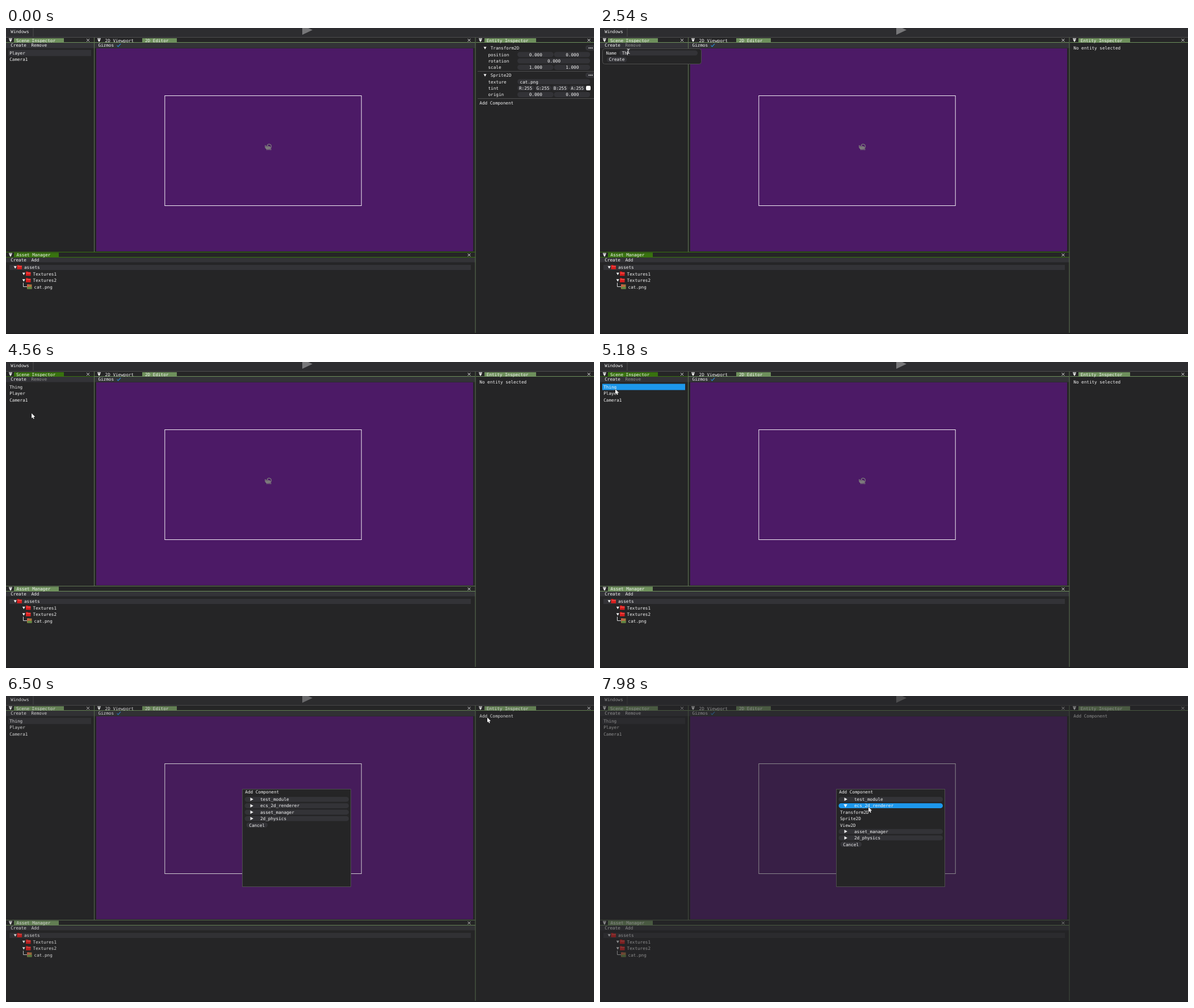
Recreate the animation shown at these times as an HTML page with a canvas. Size 1036 px wide and 540 px high, loop 8 s.

```html
<!DOCTYPE html>
<html lang="en">
<head>
<meta charset="utf-8">
<title>Scene editor</title>
<style>
html, body { margin: 0; width: 100%; height: 100%; overflow: hidden; background: #252526; }
canvas { display: block; }
</style>
</head>
<body>
<canvas id="stage" width="1036" height="540"></canvas>
<script>
const LOOP = 8000;
const ctx = document.getElementById('stage').getContext('2d');
const C = {
  bg: '#252526', bar: '#333337', top: '#2d2d30', edge: '#4e4e4e', rule: '#5f7552',
  tab: '#6e905c', focus: '#38720f', hover: '#1d97ec', press: '#0077c8',
  text: '#f4f4f4', off: '#8f8f8f', view: '#4c1a66'
};

// Moments at which the interface changes
const T = {
  popup: 1000, created: 4170, selected: 5410, modal: 6500, expanded: 7660
};
const typing = [[2320, 'T'], [2540, 'Th'], [2620, 'Thi'], [2860, 'Thin'], [3010, 'Thing']];
const presses = [[4090, 4170], [5330, 5410], [7580, 7660]];

// Pointer track: each entry holds until the next
const track = [];
const hold = (t, x, y) => track.push({ t, x, y });

function glide(t0, t1, n, a, b, c = [(a[0] + b[0]) / 2, (a[1] + b[1]) / 2]) {
  for (let i = 0; i < n; i++) {
    const s = (i + 1) / n, u = s * (1.2 - 0.2 * s), v = 1 - u;
    const mix = k => v * v * a[k] + 2 * u * v * c[k] + u * u * b[k];
    hold(t0 + (t1 - t0) * i / (n - 1), mix(0), mix(1));
  }
}

glide(220, 840, 9, [1036, 551], [20, 28]);
hold(1000, 22, 27);
hold(1075, 23, 25);
hold(1150, 25, 26);
glide(1225, 1375, 3, [25, 26], [44, 42]);
hold(1450, 44, 41);
hold(1525, 45, 40);
hold(1600, 44, 38);
hold(1760, 50, 41);
hold(3620, 50, 42);
glide(3700, 3930, 4, [50, 42], [27, 51]);
glide(4245, 4640, 6, [27, 51], [48, 97]);
glide(4820, 5180, 6, [48, 97], [27, 48]);
glide(5650, 6189, 8, [27, 48], [850, 28], [430, 272]);
glide(6266, 6420, 3, [850, 28], [848, 38]);
glide(6810, 7430, 9, [848, 38], [472, 191], [648, 103]);
hold(7890, 472.5, 194);
hold(7980, 473, 196);

const lastBefore = (list, t, key) => list.filter(e => e[key] <= t).pop();

function rect(x, y, w, h, fill) {
  ctx.fillStyle = fill;
  ctx.fillRect(x, y, w, h);
}

function pill(x, y, w, h = 9, fill = C.bar, r = 4.5, stroke) {
  ctx.beginPath();
  ctx.roundRect(x, y, w, h, r);
  ctx.fillStyle = fill;
  ctx.fill();
  if (stroke) line(stroke);
}

function line(color, width = 1) {
  ctx.strokeStyle = color;
  ctx.lineWidth = width;
  ctx.stroke();
}

function path(points, closed) {
  ctx.beginPath();
  points.forEach(p => ctx.lineTo(p[0], p[1]));
  if (closed) ctx.closePath();
}

function poly(points, fill) {
  path(points, true);
  ctx.fillStyle = fill;
  ctx.fill();
}

// y is the middle of the capitals
function text(s, x, y, fill = C.text, align = 'left') {
  ctx.textAlign = align;
  ctx.fillStyle = fill;
  ctx.fillText(s, x, y + 2.8);
}

const arrowDown = (x, y, r = 2.5) =>
  poly([[x - r, y - r * 0.8], [x + r, y - r * 0.8], [x, y + r]], C.text);
const arrowRight = (x, y) => poly([[x - 2, y - 3], [x + 3.3, y], [x - 2, y + 3]], C.text);

function cross(x, y) {
  path([[x - 2.5, y - 2.5], [x + 2.5, y + 2.5]]);
  line(C.text, 0.9);
  path([[x + 2.5, y - 2.5], [x - 2.5, y + 2.5]]);
  line(C.text, 0.9);
}

function titleBar(x, y, w, closeX, color) {
  rect(x, y, w, 8, C.bg);
  rect(x, y + 8, w, 1, color);
  rect(x + 5, y + 1, 6, 1, C.text);
  arrowDown(x + 8, y + 5, 2.9);
  cross(closeX, y + 4.5);
}

function tab(label, x, y, w, textX, color) {
  rect(x, y + 1, w, 8, color);
  text(label, textX, y + 4.7);
}

function folder(x, y) {
  poly([[x, y - 4], [x + 3.5, y - 4], [x + 4.5, y - 3], [x + 8.5, y - 3], [x + 8.5, y + 3.5], [x, y + 3.5]], '#d91e1e');
  rect(x + 1, y - 1.8, 7.5, 0.8, '#ff7770');
}

function cat() {
  ctx.beginPath();
  ctx.ellipse(462, 211.5, 4.7, 3, 0, 0, 7);
  ctx.fillStyle = '#7c777b';
  ctx.fill();
  poly([[456, 206.5], [458, 208], [460, 208], [461.5, 206.5], [461.5, 212], [459, 213.5], [456.4, 211.5]], '#817d80');
  ctx.beginPath();
  ctx.arc(463.5, 209, 4, 3.6, 7.3);
  line('#777379', 1.3);
  for (const x of [459, 461.5, 464, 466]) rect(x, 213, 1.2, 2.6, '#77727a');
  rect(457.4, 209, 1, 1, '#35253f');
  rect(459.7, 209, 1, 1, '#35253f');
}

function topBar() {
  rect(0, 0, 1036, 16, C.top);
  rect(0, 16, 1036, 1, C.edge);
  text('Windows', 8.3, 6);
  rect(47.5, 0, 1, 15, C.edge);
  poly([[522, -5], [540, 3.5], [522, 12]], '#777779');
}

function sceneList(t, p, pressed) {
  const names = t < T.created ? ['Player', 'Camera1'] : ['Thing', 'Player', 'Camera1'];
  const selected = t < T.popup || t >= T.selected ? 0 : -1;
  const live = t >= T.created && t < T.modal;
  names.forEach((name, i) => {
    const y = 38.5 + i * 11.4;
    const over = live && p.x < 150 && p.y >= y && p.y < y + 11.4;
    if (over || i === selected) rect(4, y, 146, 11, over ? (pressed ? C.press : C.hover) : C.bar);
    text(name, 6.2, y + 5.5);
  });
}

function scene(t, p, pressed) {
  const color = t >= T.created && t < T.modal ? C.focus : C.tab;
  titleBar(0, 17, 155, 144.5, color);
  tab('Scene Inspector', 14, 17, 88, 18, color);
  rect(0, 26, 155, 9.5, C.bar);
  text('Create', 8.3, 30.5);
  text('Remove', 44.5, 30.5, t >= T.popup && t < T.selected ? C.off : C.text);
  sceneList(t, p, pressed);
}

function viewport() {
  titleBar(156, 17, 671, 816, C.tab);
  text('2D Viewport', 174.6, 21.7);
  tab('2D Editor', 240, 17, 61, 245, C.tab);
  rect(156, 26, 671, 9.5, C.bar);
  text('Gizmos', 162.4, 30.5);
  path([[195.5, 30.5], [197.5, 32.8], [202, 27.8]]);
  line('#2f8fdc', 1.1);
  rect(159, 36, 664, 358, C.view);
  ctx.strokeStyle = '#f3eef5';
  ctx.lineWidth = 1;
  ctx.strokeRect(279.8, 119.5, 346.4, 194);
  cat();
}

function assets(t) {
  const color = t < T.created ? C.focus : C.tab;
  titleBar(0, 396, 827, 816, color);
  tab('Asset Manager', 14, 395.5, 79, 18.6, color);
  rect(0, 405, 827, 8.5, C.bar);
  text('Create', 8.3, 409);
  text('Add', 44.5, 409);
  rect(6, 418, 813, 9, C.bar);
  arrowDown(16.2, 422.3);
  folder(19.5, 422.3);
  text('assets', 32, 422.5);
  ['Textures1', 'Textures2'].forEach((name, i) => {
    const y = 433.8 + i * 11.4;
    arrowDown(31.3, y);
    folder(35, y);
    text(name, 47.6, y);
  });
  path([[30.5, 449.5], [30.5, 456.5], [37, 456.5]]);
  line('#d8d8d8');
  rect(37, 452.5, 8.5, 8, '#a8763f');
  rect(37, 452.5, 4, 3.5, '#c95d45');
  rect(38, 457, 7.5, 3.5, '#5d8a45');
  text('cat.png', 49.6, 456.7);
}

function field(label, y, values) {
  const w = 129 / values.length;
  text(label, 849.5, y);
  values.forEach((v, i) => {
    pill(901 + i * w, y - 4.5, w - 0.8);
    text(v, 901 + (i + 0.5) * w, y, C.text, 'center');
  });
}

function component(name, y) {
  arrowDown(844, y);
  text(name, 853.7, y);
  pill(1021, y - 5, 20, 9.5);
  for (let i = 0; i < 3; i++) rect(1026.5 + i * 2.7, y - 0.8, 1.6, 1.6, C.text);
}

function inspector(t, p) {
  titleBar(828, 17, 208, 1027, C.tab);
  tab('Entity Inspector', 843, 17, 91, 846.8, C.tab);
  if (t < T.popup) {
    component('Transform2D', 35.3);
    field('position', 46.7, ['0.000', '0.000']);
    field('rotation', 58, ['0.000']);
    field('scale', 69.4, ['1.000', '1.000']);
    rect(831, 76, 205, 1, C.edge);
    component('Sprite2D', 83.3);
    field('texture', 94.7, ['']);
    text('cat.png', 905.6, 94.7);
    text('tint', 849.5, 106);
    ['R', 'G', 'B', 'A'].forEach((c, i) => {
      pill(901 + i * 30.4, 101.5, 29.5);
      text(c + ':255', 904 + i * 30.4, 106);
    });
    pill(1022, 102, 8, 8, '#fff', 2);
    field('origin', 117.5, ['0.000', '0.000']);
    rect(831, 124, 205, 1, C.edge);
    text('Add Component', 834.3, 131.7);
  } else if (t < T.selected) {
    text('No entity selected', 834.3, 35.3);
  } else {
    if (t < T.modal && p.x > 830 && p.y > 30 && p.y < 41) rect(831, 30, 201, 11, C.hover);
    text('Add Component', 834.3, 35.3);
  }
}

function createPopup(t, p, pressed) {
  const over = p.y > 50 && p.x > 12 && p.x < 47;
  pill(4.5, 36.5, 174, 27, C.bg, 4, C.edge);
  text('Name', 10.8, 44);
  pill(34, 39.5, 138);
  const typed = lastBefore(typing, t, 0);
  if (typed) {
    text(typed[1], 38.8, 44);
    rect(39 + typed[1].length * 4.6, 40, 0.8, 8, C.text);
  }
  pill(12, 51, 35, 9.5, over ? (pressed ? C.press : C.hover) : C.bar);
  text('Create', 15.7, 55.5);
}

function modal(t, p, pressed) {
  const dim = Math.min(3, 1 + Math.floor((t - T.modal) / 80)) / 3;
  rect(0, 0, 1036, 540, `rgba(37,37,38,${dim * 0.5})`);
  rect(416, 164, 192, 173, C.edge);
  rect(417, 165, 190, 171, C.bg);
  text('Add Component', 421.3, 169);
  let y = 182.3;
  for (const name of ['test_module', 'ecs_2d_renderer', 'asset_manager', '2d_physics']) {
    const open = name === 'ecs_2d_renderer' && t >= T.expanded;
    const over = p.x > 420 && p.x < 604 && p.y > y - 5.2 && (p.y < y + 5.2 || open);
    pill(420.5, y - 4.4, 183.5, 8.8, over ? (pressed ? C.press : C.hover) : C.bar, 4.4);
    (open ? arrowDown : arrowRight)(432.5, y, 3.2);
    text(name, 448, y);
    y += 11.35;
    if (!open) continue;
    for (const item of ['Transform2D', 'Sprite2D', 'View2D']) {
      text(item, 423, y);
      y += 11.35;
    }
  }
  pill(423.5, y - 4.4, 37.5, 8.8);
  text('Cancel', 428.3, y);
}

function pointer({ x, y }, beam) {
  ctx.save();
  ctx.translate(x, y);
  if (beam) {
    path([[-2.5, -4], [0, -3.2], [2.5, -4]]);
    line('#fff', 0.9);
    path([[-2.5, 4], [0, 3.2], [2.5, 4]]);
    line('#fff', 0.9);
    path([[0, -3.2], [0, 3.2]]);
    line('#fff', 0.9);
  } else {
    path([[0, 0], [0, 8.6], [1.9, 6.9], [3.2, 10], [4.7, 9.3], [3.4, 6.4], [6.2, 6.2]], true);
    line('#111', 1);
    ctx.fillStyle = '#fff';
    ctx.fill();
  }
  ctx.restore();
}

function draw(t) {
  const p = lastBefore(track, t, 't') || { x: -50, y: -50 };
  const pressed = presses.some(([a, b]) => t >= a && t < b);
  const popup = t >= T.popup && t < T.created;
  ctx.font = '7.65px "DejaVu Sans Mono", monospace';
  ctx.textRendering = 'geometricPrecision';
  rect(0, 0, 1036, 540, C.bg);
  topBar();
  scene(t, p, pressed);
  viewport();
  assets(t);
  inspector(t, p);
  rect(155, 17, 1, 378, C.rule);
  rect(826.5, 17, 1, 523, C.rule);
  rect(0, 395, 827, 1, t < T.created ? C.focus : C.rule);
  rect(0, 538, 1036, 2, '#1f1f20');
  if (popup) createPopup(t, p, pressed);
  if (t >= T.modal) modal(t, p, pressed);
  pointer(p, popup && p.x > 33 && p.y >= 38 && p.y < 49);
}

const start = performance.now();
function frame() {
  draw((performance.now() - start) % LOOP);
  requestAnimationFrame(frame);
}
frame();
</script>
</body>
</html>
```
